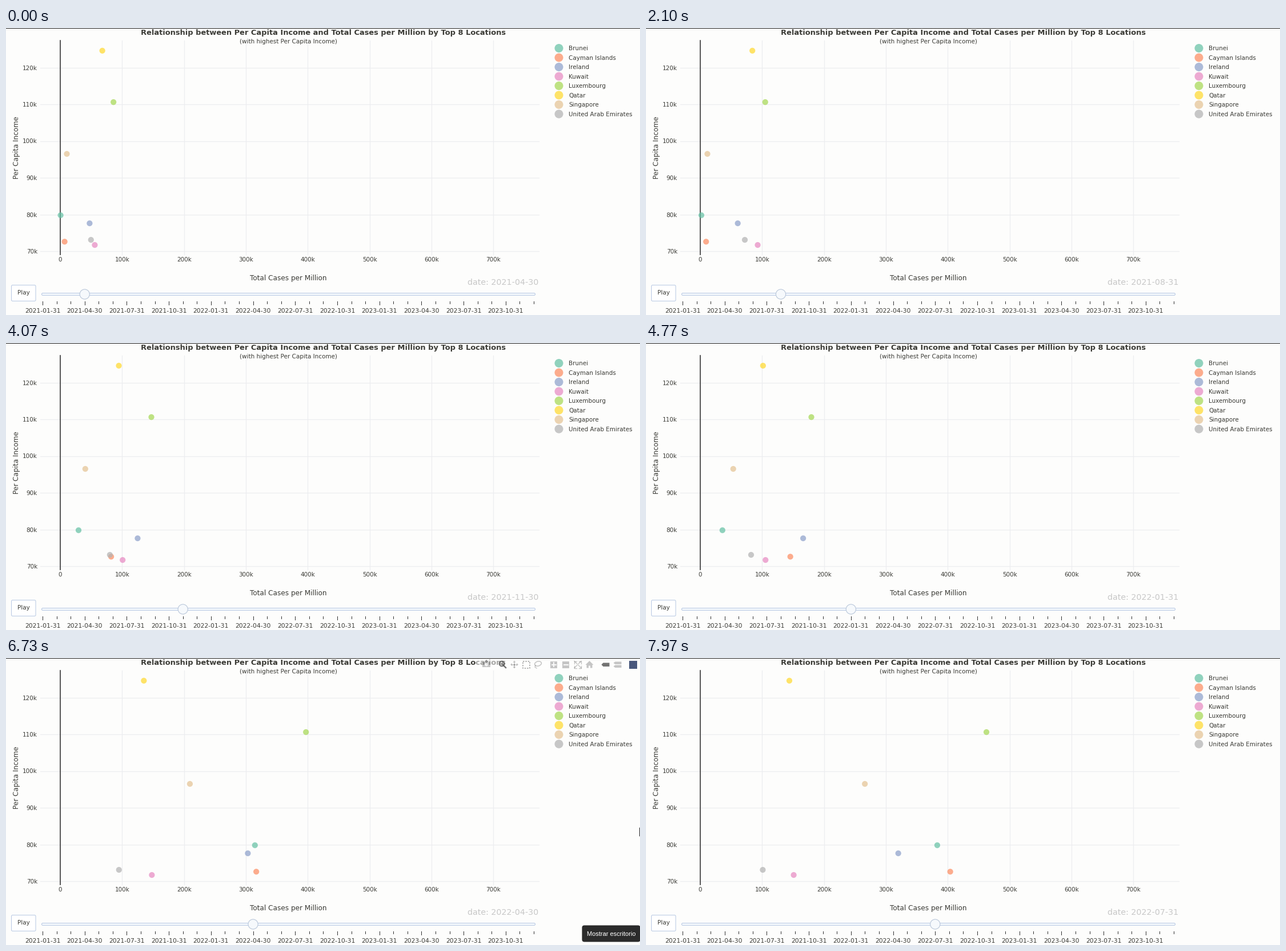
A matplotlib script that plays this animation: 1110 px wide and 504 px high, repeating every 8000 ms.

```python
import numpy as np
import matplotlib.pyplot as plt
from matplotlib.animation import FuncAnimation
from matplotlib.patches import Circle, Ellipse, FancyBboxPatch, Polygon, Rectangle

W, H, DPI = 1110, 504, 100
LOOP, STEP = 8000, 40
BEAT, GLIDE, LEAD = 530, 500, 50  # month length, travel time, head start (ms)
INK, GRID, EDGE, ICON = "#3b3b36", "#ecedf0", "#b7c8e3", "#444444"
BG = "#fdfdfc"

# income, then cases per million (both in thousands) at the key times
KEY_TIMES = np.array([0, 2100, 3370, 4770, 5470, 6730, 7970])
PLACES = {
    "Brunei": (79.8, [.5, 1.8, 24, 35, 91, 314, 383]),
    "Cayman Islands": (72.6, [7, 9.4, 19.5, 144, 247, 316, 404]),
    "Ireland": (77.6, [47.3, 60.6, 84.4, 165, 249, 303, 320]),
    "Kuwait": (71.7, [55.4, 92.8, 96.5, 105, 137, 148, 151]),
    "Luxembourg": (110.6, [85.8, 105, 116, 178, 281.5, 396.5, 462.5]),
    "Qatar": (124.6, [67.8, 84.2, 88.2, 101, 129, 135, 144]),
    "Singapore": (96.5, [10.6, 11.5, 28.1, 52.6, 98.3, 209, 266]),
    "United Arab Emirates": (73.1, [49.4, 72, 78.3, 82, 91.4, 94.8, 101]),
}
DAYS = (31, 28, 31, 30, 31, 30, 31, 31, 30, 31, 30, 31)

fig = plt.figure(figsize=(W / DPI, H / DPI), dpi=DPI, facecolor=BG)
ax = fig.add_axes([0, 0, 1, 1])
ax.set(xlim=(0, W), ylim=(H, 0))
ax.axis("off")


def text(x, y, s, size=10.4, color=INK, ha="center", va="baseline", **kw):
    kw.setdefault("family", "DejaVu Sans")
    return ax.text(x, y, s, fontsize=size * .72, color=color, ha=ha, va=va, **kw)


def line(xs, ys, color=INK, width=1, **kw):
    return ax.plot(xs, ys, color=color, lw=width * .72, **kw)[0]


def box(x0, y0, x1, y1, r, face, edge, z=2):
    return ax.add_patch(FancyBboxPatch(
        (x0 + r, y0 + r), x1 - x0 - 2 * r, y1 - y0 - 2 * r,
        boxstyle=f"round,pad={r}", fc=face, ec=edge, lw=.72, zorder=z))


def to_x(cases):
    return 95 + 1.0833 * cases


def to_y(income):
    return 392 - 6.45 * (income - 70)


def stop_x(month):
    return 64 + 24.57 * month


def date(month):
    year, m = divmod(month, 12)
    return f"{2021 + year}-{m + 1:02d}-{DAYS[m]}"


def clock(t):
    """Months gone by: glide for GLIDE ms, then rest until the next beat."""
    beat, rest = np.divmod(t + LEAD, BEAT)
    return beat + np.minimum(rest / GLIDE, 1)


# plot area
ax.add_patch(Rectangle((0, 0), W, 1, fc="#1e1e1e", lw=0, aa=False))
for income in range(70, 121, 10):
    y = to_y(income)
    line([60, 933], [y, y], GRID, 1.2, zorder=1)
    text(55, y + 4, f"{income}k", ha="right")
for cases in range(0, 701, 100):
    x = to_x(cases)
    if cases:
        line([x, x], [22, 398], GRID, 1.2, zorder=1)
    text(x, 410, f"{cases}k" if cases else "0")
line([95, 95], [22, 398], "#3c3c3c", 1.7, zorder=2, snap=False)

text(555, 12, "Relationship between Per Capita Income and Total Cases "
     "per Million by Top 8 Locations", 13, weight="bold")
text(494, 27, "(with highest Per Capita Income)")
text(494, 443, "Total Cases per Million", 12)
text(18.5, 210, "Per Capita Income", 12, va="center", rotation=90)
stamp = text(932, 451, "", 14.2, "#c8c8c8", ha="right")

# legend and markers
dots = []
for i, (name, (income, _)) in enumerate(PLACES.items()):
    look = dict(fc=plt.cm.Set2(i), alpha=.72, lw=0)
    y = 35.5 + 16.5 * i
    ax.add_patch(Circle((968, y), 7.5, **look))
    text(985, y + 3.7, name, ha="left")
    dots.append(ax.add_patch(Circle((0, to_y(income)), 5.1, zorder=3, **look)))

# button and slider
box(9.5, 451.5, 52, 479.5, 2, "white", EDGE)
text(31, 468.5, "Play")
box(62.5, 465.5, 926.5, 469.5, 1.9, "#f3f7fc", EDGE)
for month in range(36):
    major = month % 3 == 0
    line([stop_x(month)] * 2, [480, 486 if major else 483.5], "#333333")
    if major:
        text(stop_x(month), 500, date(month), 10.7)
handle = ax.add_patch(Circle((0, 467.5), 8.6, fc="#f6f9fc", ec="#b9c7da",
                             lw=.8, zorder=4))

# hover toolbar: (artist, full opacity)
bar = []


def icon(artist, alpha, z):
    artist.set_zorder(z)
    bar.append((artist, alpha))


def shape(patch, alpha=.3, color=ICON, z=6):
    patch.set(fc=color, ec="none")
    icon(ax.add_patch(patch), alpha, z)


def stroke(xs, ys, alpha=.3, width=1.6, color=ICON, z=6, **kw):
    icon(line(xs, ys, color, width, **kw), alpha, z)


def ring(patch, alpha=.3, width=1.6):
    patch.set(fc="none", ec=ICON, lw=width * .72)
    icon(ax.add_patch(patch), alpha, 6)


def tag(y, x, w, h, alpha=.3):
    shape(Polygon([(x, y), (x + 3, y - h / 2), (x + w, y - h / 2),
                   (x + w, y + h / 2), (x + 3, y + h / 2)]), alpha)


MID = 11.5
shape(Rectangle((823, 2), 287, 18), .55, "white", 5)

# camera
shape(Rectangle((834, 7), 14, 9))
shape(Rectangle((838, 5), 6, 2))
shape(Circle((841, MID), 3), .8, "white", 7)

# magnifier
ring(Circle((868, 10), 4.3), .75, 2)
stroke([871, 875], [13, 17], .75, 2.4)
stroke([866, 870], [10, 10], .75, 1.2)
stroke([868, 868], [8, 12], .75, 1.2)

# pan arrows
for dx, dy in ((1, 0), (-1, 0), (0, 1), (0, -1)):
    cx, cy = 890 + 4 * dx, MID + 4 * dy
    stroke([890, cx], [MID, cy])
    shape(Polygon([(cx + 3 * dx, cy + 3 * dy), (cx + 2.5 * dy, cy + 2.5 * dx),
                   (cx - 2.5 * dy, cy - 2.5 * dx)]))

# box and lasso selection
stroke([904.5, 916.5, 916.5, 904.5, 904.5], [5.5, 5.5, 17.5, 17.5, 5.5],
       .4, 2, ls=(0, (1.2, 1)))
ring(Ellipse((931.5, 10), 12, 8, angle=-15))
stroke([927, 926, 929], [13, 16, 18], .3, 1.4)

# zoom in, zoom out, fit
for x in (959, 980):
    shape(Rectangle((x - 6, 5.5), 12, 12))
    stroke([x - 3.5, x + 3.5], [MID, MID], .9, 2, "white", 7)
stroke([959, 959], [8, 15], .9, 2, "white", 7)
for sx in (-1, 1):
    for sy in (-1, 1):
        ex, ey = 1001 + 6 * sx, MID + 6 * sy
        stroke([1001 + sx, ex], [MID + sy, ey], .3, 1.4)
        stroke([ex - 4 * sx, ex, ex], [ey, ey, ey - 4 * sy], .3, 1.4)

# house, hover tags, badge
half = [(0, 5), (7, 12), (5, 12), (5, 17.5), (1.5, 17.5), (1.5, 13.5)]
shape(Polygon([(1021.5 + x, y) for x, y in half]
              + [(1021.5 - x, y) for x, y in half[::-1]]))
tag(11.7, 1042.5, 14, 6.5, .75)
for y in (8.7, 14.7):
    tag(y, 1063.5, 14, 4.5)
shape(Rectangle((1091, 4.5), 14, 14), .95, "#3f4f75")

# desktop tooltip and pointer edge
tip = [box(1009, 470, 1110, 498, 3.5, "#2b2b2b", "#242424", z=6),
       text(1059.5, 487.5, "Mostrar escritorio", 11, "white",
            family="Liberation Sans", zorder=7)]
pointer = line([1109.3, 1109.3], [298, 312], ICON, 1.4, zorder=6)


def update(n):
    t = (n + .5) * STEP
    now = clock(t)
    for dot, (_, cases) in zip(dots, PLACES.values()):
        dot.center = to_x(np.interp(now, clock(KEY_TIMES), cases)), dot.center[1]
    month = int((t + LEAD) // BEAT) + 3
    stamp.set_text("date: " + date(month))
    handle.center = stop_x(month), 467.5

    fade = np.interp(t, [6400, 6650, 7000, 7300], [0, 1, 1, 0])
    for artist, alpha in bar:
        artist.set_visible(fade > 0)
        artist.set_alpha(alpha * fade)
    for artist in tip:
        artist.set_visible(5030 <= t < 7600)
    pointer.set_visible(6640 <= t < 6840)


anim = FuncAnimation(fig, update, frames=LOOP // STEP, interval=STEP,
                     init_func=lambda: update(0), repeat=True, repeat_delay=0)
plt.show()
```
